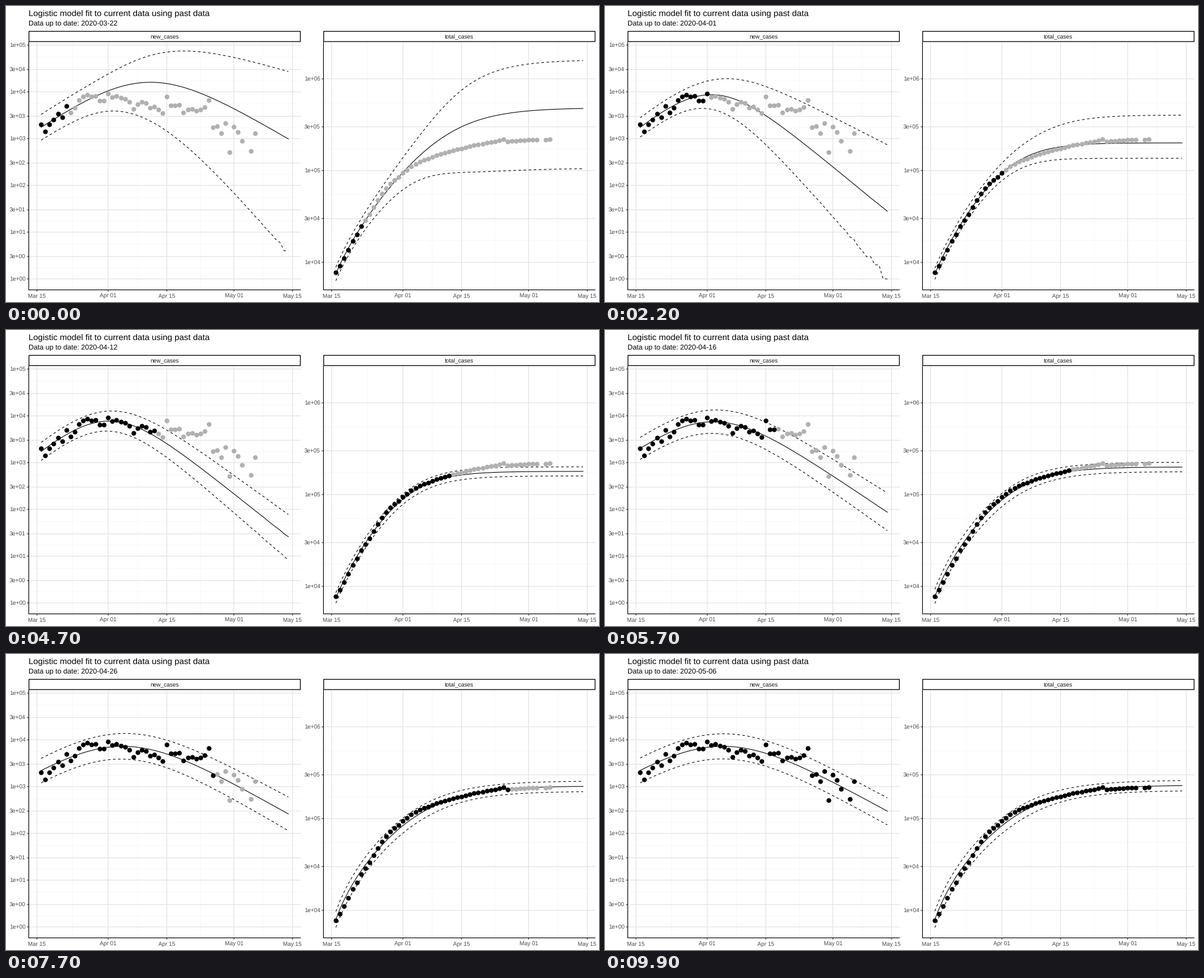
A matplotlib script for the animation above (10 s loop, 1000 by 500 pixels).

```python
import numpy as np
import matplotlib.pyplot as plt
from matplotlib.animation import FuncAnimation
from matplotlib.patches import Rectangle

FRAMES, INTERVAL = 100, 100
LAST = 45                  # days between the first and the last fit
PX = 0.72                  # points per pixel at 100 dpi
WIDTH = 458.6              # panel width
DAY_W = WIDTH / 64.9       # pixels per day
TOP, BOTTOM = 60.5, 479.5
START_TOTAL = 5753
NEW_SCALE = (461, 79)      # height of the value 1, pixels per decade
SUM_SCALE = (1053, 155)

plt.rcParams["font.family"] = "Liberation Sans"
plt.rcParams["text.hinting"] = "none"
plt.rcParams["path.snap"] = False

# Observed daily counts from 16 March on; one day has no report.
NEW = np.array([
    2000, 1438, 1987, 2538, 3431, 2833, 4946, 3646, 4517, 6584, 7937, 8578,
    7871, 8189, 6549, 6398, 9222, 7719, 8102, 7472, 7026, 6023, 4273, 5478,
    6180, 5756, 4576, 4830, 4167, 3477, 7940, 5092, 5183, 5252, 3658, 4218,
    4266, 3968, 4211, 4635, 6740, 1729, 1831, 1308, 2144, 518, 1781, 1366,
    884, np.nan, 545, 1318])
DAYS = np.arange(1, len(NEW) + 1)
FIT_DAYS = np.arange(1, 61)

# Fit parameters at a few key days; the days between are interpolated.
KEYS = [0, 7, 10, 17, 26, 31, 45]
PEAK = [129, 144, 149.8, 153, 155, 156, 156]           # height of the top
MIDDLE = [26, 20.5, 18, 16, 18, 19.7, 20]              # day of the top
RISE = [0.141, 0.161, 0.17, 0.192, 0.149, 0.128, 0.125]
FALL = [0.122, 0.156, 0.17, 0.185, 0.139, 0.118, 0.114]
BAND = [21.5, 17, 16, 12.5, 18.5, 20.5, 21]            # width of the band
WIDEN_UP = [2.1, 2.2, 2.2, 0.68, 0.32, 0.24, 0.03]     # pixels per day
WIDEN_DOWN = [3.9, 4, 2.2, 0.75, 0.28, 0.22, 0.05]
SUM_BAND = [10, 9, 9, 6.5, 12, 13.5, 14]
SUM_UP = [71, 48, 38, 1, -4, -5, -5.5]
SUM_DOWN = [92, 40, 17, 1, -4, -4.5, -5]


def height(value, scale):
    one, decade = scale
    with np.errstate(divide="ignore"):
        return np.minimum(one - decade * np.log10(value), BOTTOM)


def count(y, scale):
    one, decade = scale
    return 10 ** ((one - y) / decade)


def running_total():
    step = np.nan_to_num(NEW)
    step[30] = 3045          # part of the late reports is not added
    step[41] -= 13859        # revision of the count
    total = START_TOTAL + np.cumsum(step)
    total[np.isnan(NEW)] = np.nan
    return total


def fit_curves(k):
    """Middle, upper and lower heights for both panels, k days in."""
    def at(values):
        return np.interp(k, KEYS, values)

    # Logistic growth rate with its own steepness on each side.
    t = FIT_DAYS - at(MIDDLE)
    bell = (np.exp(-at(RISE) * t / 2) + np.exp(at(FALL) * t / 2)) / 2
    daily = count(at(PEAK), NEW_SCALE) / bell**2
    y = height(daily, NEW_SCALE)
    late = 4 * np.log1p(np.exp((FIT_DAYS - 16) / 4))
    new = [y, y - at(BAND) - at(WIDEN_UP) * late,
           y + at(BAND) + at(WIDEN_DOWN) * late]
    # Fitted daily counts are whole numbers, which shows near the bottom.
    new = [height(np.round(count(c, NEW_SCALE)), NEW_SCALE) for c in new]

    y = height(START_TOTAL + np.cumsum(daily), SUM_SCALE)
    late = 1 / (1 + np.exp((25 - FIT_DAYS) / 6))
    total = [y, y - at(SUM_BAND) - at(SUM_UP) * late,
             y + at(SUM_BAND) + at(SUM_DOWN) * late]
    return new, total


class Panel:
    def __init__(self, ax, left, name, scale, ticks, counts):
        self.ax, self.left, self.scale = ax, left, scale
        self.draw_frame(name, ticks)
        self.x = self.x_pos(DAYS)
        self.y = height(counts, scale)
        self.curves = [self.curve(dashed) for dashed in (False, True, True)]
        self.later = self.dots("#b0b0b0", 4)
        self.known = self.dots("black", 5)

    def x_pos(self, day):
        return self.left + DAY_W * (np.asarray(day) + 1.95)

    def curve(self, dashed):
        x = self.x_pos(FIT_DAYS)
        line, = self.ax.plot(x, x, color="black", lw=1.07 * PX, zorder=3)
        if dashed:
            line.set_dashes((4, 4))
            line.set_dash_capstyle("butt")
        return line

    def dots(self, color, z):
        return self.ax.plot([], [], "o", color=color, ms=8 * PX, mew=0, zorder=z)[0]

    def line(self, xs, ys, color, width, z):
        self.ax.plot(xs, ys, color=color, lw=width * PX, zorder=z,
                     solid_capstyle="butt")

    def draw_frame(self, name, ticks):
        a, b = self.left, self.left + WIDTH
        xs = self.x_pos([0, 17, 31, 47, 61])
        ys = height([float(s) for s in ticks], self.scale)
        for x in (xs[1:] + xs[:-1]) / 2:
            self.line([x, x], [TOP, BOTTOM], "#f4f4f4", 0.6, 1)
        for y in (ys[1:] + ys[:-1]) / 2:
            self.line([a, b], [y, y], "#f4f4f4", 0.6, 1)
        labels = ["Mar 15", "Apr 01", "Apr 15", "May 01", "May 15"]
        style = dict(fontsize=9.6 * PX, color="#4d4d4d", va="baseline")
        for x, s in zip(xs, labels):
            self.line([x, x], [TOP, BOTTOM], "#e2e2e2", 1.16, 1.5)
            self.line([x, x], [BOTTOM, BOTTOM + 3], "#333333", 1.1, 2)
            self.ax.text(x, 493, s, ha="center", **style)
        for y, s in zip(ys, ticks):
            self.line([a, b], [y, y], "#e2e2e2", 1.16, 1.5)
            self.line([a - 3, a], [y, y], "#333333", 1.1, 2)
            self.ax.text(a - 5.4, y + 3.5, s, ha="right", **style)
        self.line([a, a], [TOP, BOTTOM + 0.5], "black", 1.16, 6)
        self.line([a - 0.5, b], [BOTTOM, BOTTOM], "black", 1.16, 6)
        self.ax.add_patch(Rectangle((a + 0.3, 42.8), WIDTH - 0.9, 17.3, fc="white",
                                    ec="black", lw=1.3 * PX, zorder=6))
        self.ax.text((a + b) / 2, 55, name, ha="center", va="baseline",
                     fontsize=9.6 * PX, color="#1a1a1a", zorder=7)

    def update(self, k, heights):
        for line, y in zip(self.curves, heights):
            line.set_ydata(y)
        n = 7 + k
        self.known.set_data(self.x[:n], self.y[:n])
        self.later.set_data(self.x[n:], self.y[n:])


def date_label(k):
    day = 22 + k
    for month, length in ((3, 31), (4, 30), (5, 31)):
        if day <= length:
            return f"2020-{month:02d}-{day:02d}"
        day -= length


fig = plt.figure(figsize=(10, 5), dpi=100, facecolor="white")
ax = fig.add_axes([0, 0, 1, 1])
ax.set_xlim(0, 1000)
ax.set_ylim(500, 0)
ax.axis("off")

new_ticks = [f"{m}e+{e:02d}" for e in range(5) for m in (1, 3)] + ["1e+05"]
sum_ticks = new_ticks[8:] + ["3e+05", "1e+06"]
panels = [Panel(ax, 38.4, "new_cases", NEW_SCALE, new_ticks, NEW),
          Panel(ax, 535.4, "total_cases", SUM_SCALE, sum_ticks, running_total())]

ax.text(38, 17, "Logistic model fit to current data using past data",
        fontsize=14.4 * PX, va="baseline")
subtitle = ax.text(38, 34, "", fontsize=12 * PX, va="baseline")


def update(i):
    # The label follows the clock; the fits switch at the nearest step.
    subtitle.set_text("Data up to date: " + date_label(i * LAST // (FRAMES - 1)))
    k = sum(round(2.2 * j) <= i for j in range(1, LAST + 1))
    for panel, heights in zip(panels, fit_curves(k)):
        panel.update(k, heights)


anim = FuncAnimation(fig, update, frames=FRAMES, interval=INTERVAL,
                     repeat=True, repeat_delay=0, blit=False)
plt.show()
```
